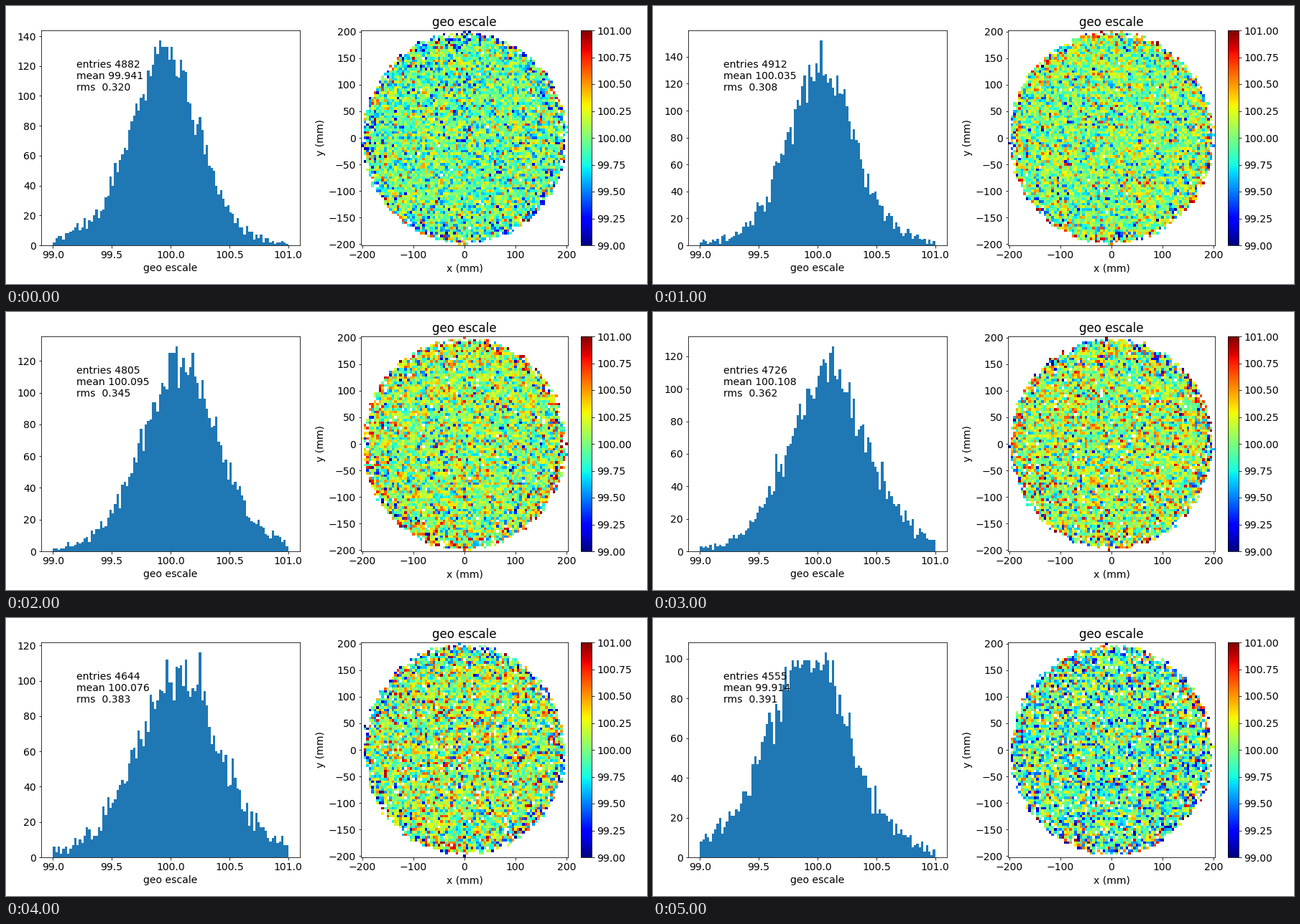
These frames come from a looping animation (892x388 px, 5.5 s). A matplotlib script:

```python
import numpy as np
import matplotlib.pyplot as plt
from matplotlib.animation import FuncAnimation

W, H, DPI = 892, 388, 72
FRAMES, STEP = 11, 500
plt.rcParams.update({"font.family": "DejaVu Sans", "font.size": 14})

# key points: step, entries, mean, rms, tallest bar's height and value
KEYS = np.array([
    (0, 4882, 99.941, 0.320, 137, 99.91),
    (1, 4964, 100.001, 0.292, 160, 100.07),
    (3, 4860, 100.070, 0.325, 145, 100.01),
    (4, 4805, 100.095, 0.345, 129, 100.05),
    (6, 4726, 100.108, 0.362, 126, 100.13),
    (8, 4644, 100.076, 0.383, 116, 100.25),
    (10, 4555, 99.914, 0.391, 103, 100.07),
]).T

EDGES = np.linspace(99, 101, 101)
MID = (EDGES[:-1] + EDGES[1:]) / 2
GRID = np.arange(-200, 201, 5)
X, Y = np.meshgrid(GRID, GRID)
R = np.hypot(X, Y) / 201.5
DISK = R <= 1


def bell(center, width):
    y = np.exp(-0.5 * ((MID - center) / width) ** 2)
    return y / y.sum()


def make_counts(rng, entries, mean, rms, top, peak):
    """A narrow core on a wide, slightly skewed base, with counting noise."""
    drift = mean - 100
    curve = entries * (0.7 * bell(mean - 0.3 * drift, 0.83 * rms)
                       + 0.3 * bell(mean + 0.7 * drift, 1.4 * rms))
    counts = np.round(curve + rng.normal(0, 0.7, MID.size) * np.sqrt(curve))
    counts = np.clip(counts, 0, top - 4)
    counts[np.argmin(abs(MID - peak))] = top
    return counts


def make_map(rng, k, counts, entries):
    """Spread the histogram's values over the disk, wilder near the rim."""
    r = R[DISK]
    rim = 0.8 * np.sin(0.7 * (k - 1.2))
    score = rng.normal(size=r.size) * (0.85 + 0.9 * r ** 14) + rim * r ** 16

    # cells out of range stay blank, mostly along the rim
    lost = np.log(0.002 + 0.0012 * k + r ** 60) + rng.gumbel(size=r.size)
    kept = np.argsort(lost)[:entries]

    rank = np.argsort(np.argsort(score[kept]))
    cdf = np.concatenate([[0], np.cumsum(counts)]) / counts.sum()
    vals = np.full(r.size, np.nan)
    vals[kept] = np.interp((rank + 0.5) / kept.size, cdf, EDGES)
    grid = np.full(R.shape, np.nan)
    grid[DISK] = vals
    return grid


def make_step(k):
    rng = np.random.default_rng(100 + k)
    entries, mean, rms, top, peak = (np.interp(k, KEYS[0], row) for row in KEYS[1:])
    entries, top = int(entries), int(top)
    counts = make_counts(rng, entries, mean, rms, top, peak)
    label = f"entries {entries}\nmean {mean:.3f}\nrms  {rms:.3f}"
    return counts, make_map(rng, k, counts, entries), label


steps = [make_step(k) for k in range(FRAMES)]

fig = plt.figure(figsize=(W / DPI, H / DPI), dpi=DPI, facecolor="white")


def add_axes(left, right, top=34, bottom=334):
    return fig.add_axes([left / W, 1 - bottom / H,
                         (right - left) / W, (bottom - top) / H])


ax = add_axes(49, 409)
bars = ax.bar(EDGES[:-1], steps[0][0], width=0.02, align="edge", color="#1f77b4")
ax.set_xlim(98.9, 101.1)
ax.set_xticks(np.arange(99, 101.1, 0.5))
ax.set_xlabel("geo escale")
note = ax.text(99.2, 0.72, "", transform=ax.get_xaxis_transform())

mx = add_axes(494, 782)
img = mx.imshow(steps[0][1], cmap="jet", vmin=99, vmax=101, origin="lower",
                extent=[-202.5, 202.5, -202.5, 202.5], aspect="auto",
                interpolation="nearest")
mx.set_xticks(range(-200, 201, 100))
mx.set_yticks(range(-200, 201, 50))
mx.set_xlabel("x (mm)")
mx.set_ylabel("y (mm)")
mx.set_title("geo escale")

fig.colorbar(img, cax=add_axes(800, 815),
             ticks=np.arange(99, 101.1, 0.25), format="%.2f")


def draw(k):
    counts, grid, label = steps[k]
    for bar, n in zip(bars, counts):
        bar.set_height(n)
    limit = 1.05 * counts.max()
    ax.set_ylim(0, limit)
    ax.set_yticks(np.arange(0, limit, 20))
    note.set_text(label)
    img.set_data(grid)
    return [*bars, note, img]


anim = FuncAnimation(fig, draw, frames=FRAMES, interval=STEP,
                     repeat=True, repeat_delay=0, blit=False)
plt.show()
```
